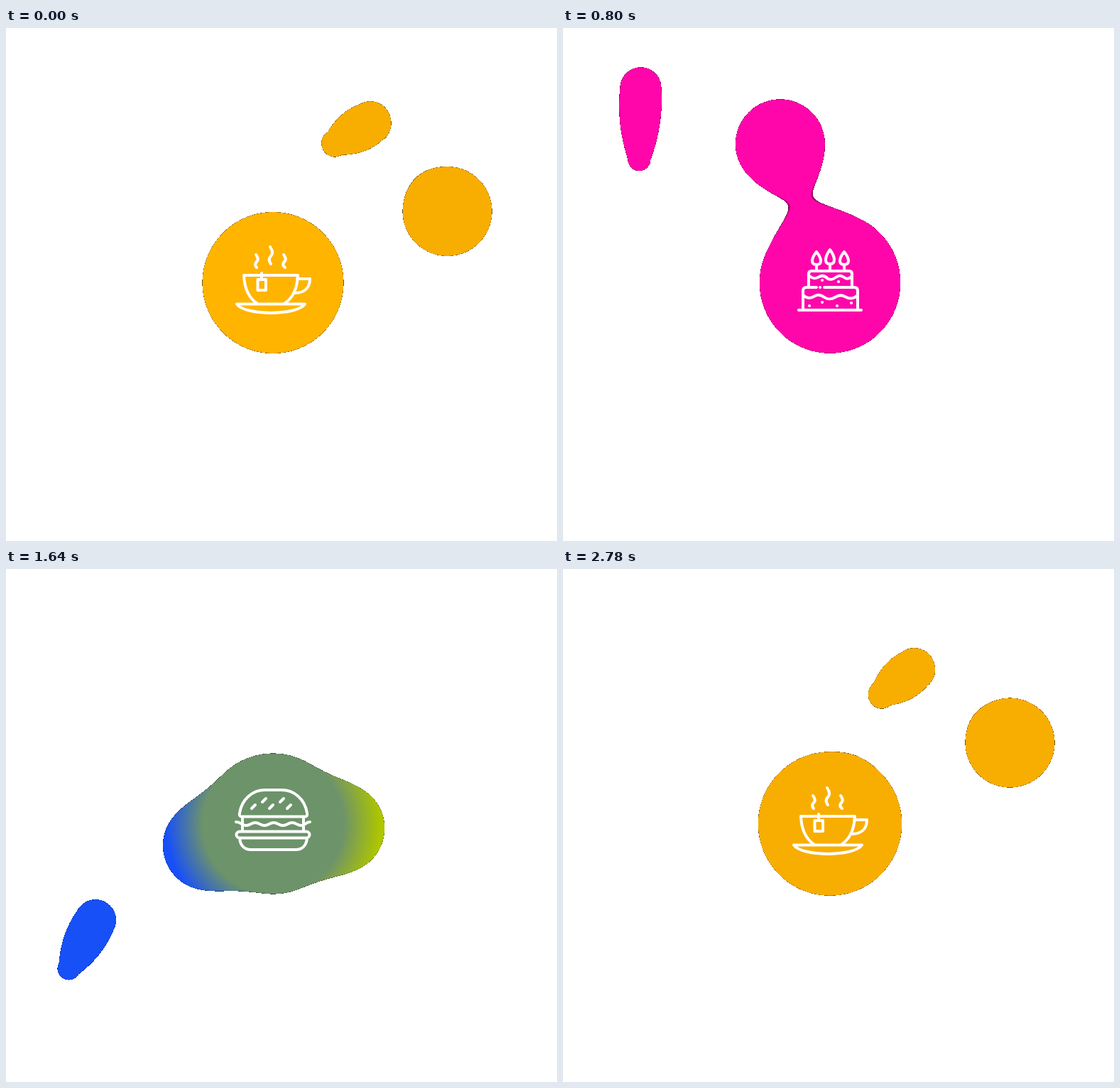
Animation of 776 by 722 pixels, one loop 2800 ms. Source, as an HTML page with a canvas:

```html
<!DOCTYPE html>
<html lang="en">
<head>
<meta charset="utf-8">
<title>Food blobs</title>
<style>
html, body { margin: 0; width: 100%; height: 100%; overflow: hidden; background: #fff; }
canvas { display: block; }
</style>
</head>
<body>
<canvas id="stage" width="776" height="722"></canvas>
<script>
const W = 776, H = 722, CX = 376, CY = 358.5;
const LOOP = 2800, PHASE = 700, BLEND = 97, LAG = 75;
const ctx = document.getElementById('stage').getContext('2d');
const image = ctx.createImageData(W, H);
const pixels = new Uint32Array(image.data.buffer);

// Each item leaves the centre along (fx, fy) and curls clockwise back into it.
const items = [
  { color: [255, 6, 171], fx: -1, fy: 0, su: 1.137, sv: 1.043, dv: 1.05, delay: 0 },
  { color: [24, 80, 248], fx: 0, fy: 1, su: 1.29, sv: 1.03, dv: 1.12, delay: 0 },
  { color: [174, 198, 0], fx: 1, fy: 0, su: 1.2, sv: 1.008, dv: 0.97, delay: 20 },
  { color: [248, 174, 0], fx: 0, fy: -1, su: 1, sv: 1, dv: 1, delay: 0 }
];
const firstColor = [255, 180, 0];

// [time, forward, sideways]
const circlePath = [
  [80, 0, 0], [220, 78, 6], [380, 175, 64], [440, 208, 108], [500, 234, 170],
  [600, 193, 251], [700, 101, 246], [940, 24, 90], [1060, 0, 0]
];
const dropPath = [
  [400, 0, 0], [460, 60, 15], [530, 140, 45], [606, 183, 73], [623, 195, 85], [680, 218, 118],
  [700, 226, 136], [760, 245, 205], [810, 228, 268], [865, 159, 257], [940, 106, 224],
  [985, 60, 166], [1025, 38, 148], [1065, 29, 140], [1160, 0, 0]
];
// [time, radius]
const pulse = [
  [0, 99.5], [240, 99], [340, 99.5], [380, 104], [400, 115],
  [450, 116], [540, 114], [640, 105], [700, 99.5]
];

const icons = [
  // cake
  `M332 397H420 M338 396V370q0-5 5-5H357 M362 365h.1 M368 365H410q5 0 5 5V396
   M338 376c7 6 12 4 17 1s9-1 13 2 10 3 15 0 9-4 14-1 12 4 18-2
   M346 364V346q0-4 4-4H403q4 0 4 4V364 M347 349c6 5 10 3 14 1s8-1 11 2 8 2 12-1 8-3 12 0 7 2 10-1
   M357 333V341 M376 332V341 M396 333V341
   M357 315c8 10 8 18 0 18s-8-8 0-18z M376 312c8 11 8 20 0 20s-8-9 0-20z M396 315c8 10 8 18 0 18s-8-8 0-18z
   M365 355h.1 M388 357h.1 M347 391h.1 M365 386h.1 M386 391h.1 M406 387h.1`,
  // burger
  `M332 348.5H421q4 0 3-5C421 324 406 311 388 311H365C347 311 332 324 329 343.5q-1 5 3 5z
   M346 337l5-5 M361 328l5-5 M371 337l5-5 M386 328l5-5 M396 337l5-5
   M333 349V369 M419 349V369
   M324 356c7 0 8 5 14 5s7-4 13-4 7 4 13 4 7-4 13-4 7 4 13 4 7-4 13-4 7 4 13 4 6-5 12-5
   M329 369.5H423a4.5 4.5 0 0 1 0 9H329a4.5 4.5 0 0 1 0-9z
   M329 379c1 10 7 16 16 16H408c9 0 15-6 16-16`,
  // bottles
  `M341 310H350V335C359 339 360 341 360 347V399.5H332V347C332 341 333 339 341 335z
   M341 317H350 M332 358H360 M332 382H360
   M371 310H381V333C383 342 389 345 389 356V399.5H363V356C363 345 369 342 371 333z
   M371 317H381 M370 370a6 6 0 0 0 12 0a6 6 0 0 0-12 0
   M402 310H411V323C419 328 421 333 421 341V399.5H392V341C392 333 394 328 402 323z
   M402 317H411 M398.5 350h16v40h-16z`,
  // tea cup
  `M352 319c4 5 3 8 1 10s-3 5 0 8 M372 308c4 6 4 10 1 13s-3 7 0 11 M391 319c4 5 3 8 1 10s-3 5 1 8
   M354 388C345 382 336 372 335 348H411C410 372 401 382 392 388
   M410 353H428C428 366 420 373 406 373
   M325 388.5H421C410 405 336 405 325 388.5z
   M360 345V354 M354.5 354h11.5v15h-11.5z`
].map(d => new Path2D(d));

const clamp = (x, lo = 0, hi = 1) => Math.min(hi, Math.max(lo, x));
const mix = (a, b, k) => a.map((v, i) => v + (b[i] - v) * k);

// Smooth curve through timed keys; returns the values at time p.
function track(keys, p) {
  const last = keys.length - 1;
  if (p <= keys[0][0]) return keys[0].slice(1);
  if (p >= keys[last][0]) return keys[last].slice(1);
  let i = 0;
  while (p >= keys[i + 1][0]) i++;
  const a = keys[i], b = keys[i + 1];
  const before = keys[Math.max(0, i - 1)], after = keys[Math.min(last, i + 2)];
  const h = b[0] - a[0], s = (p - a[0]) / h, r = 1 - s;
  return a.slice(1).map((v, j) => {
    const n = j + 1;
    const m0 = (b[n] - before[n]) / (b[0] - before[0]) * h;
    const m1 = (after[n] - a[n]) / (after[0] - a[0]) * h;
    return r * r * (1 + 2 * s) * v + s * r * r * m0 + s * s * (3 - 2 * s) * b[n] - s * s * r * m1;
  });
}

function place(item, [u, v], sv) {
  u *= item.su;
  v *= sv;
  return [CX + item.fx * u - item.fy * v, CY + item.fy * u + item.fx * v];
}

// A blob is a rounded capsule from (x, y) to (x + dx, y + dy) with a swollen waist.
function blob(color, [x, y], r, [ex, ey], er) {
  const dx = ex - x, dy = ey - y;
  const reach = Math.max(Math.hypot(x - CX, y - CY), Math.hypot(ex - CX, ey - CY));
  return { color, x, y, r, dx, dy, taper: er - r, len: dx * dx + dy * dy || 1,
           k: BLEND * clamp((reach - 30) / 150) };
}

// The tail gets thinner the further it is stretched.
function drop(color, head, tail) {
  const stretch = Math.hypot(tail[0] - head[0], tail[1] - head[1]);
  return blob(color, head, 29, tail, clamp(42 - stretch * 0.4, 16, 29));
}

function blobsAt(t) {
  const list = [];
  items.forEach((item, i) => {
    const p = (t - PHASE * i - item.delay + LOOP) % LOOP;
    if (p > 80 && p < 1060) {
      const c = place(item, track(circlePath, p), item.sv);
      list.push(blob(item.color, c, 63, c, 63));
    }
    if (p > 400 && p < 1160 + LAG) {
      const [head, tail] = [p, p - LAG].map(s => place(item, track(dropPath, s), item.dv));
      list.push(drop(item.color, head, tail));
    }
  });
  return list.filter(b => b.k > 0);
}

function paint(blobs, radius, main) {
  pixels.fill(0xffffffff);
  for (let y = 0, at = 0; y < H; y++) {
    for (let x = 0; x < W; x++, at++) {
      const mx = x + 0.5 - CX, my = y + 0.5 - CY;
      const core = Math.sqrt(mx * mx + my * my) - radius;
      let d = core, near = 1e9, color = main;
      for (const b of blobs) {
        const px = x + 0.5 - b.x, py = y + 0.5 - b.y;
        let h = (px * b.dx + py * b.dy) / b.len;
        h = h < 0 ? 0 : h > 1 ? 1 : h;
        const qx = px - b.dx * h, qy = py - b.dy * h;
        const e = Math.sqrt(qx * qx + qy * qy) - b.r - b.taper * h - 22 * h * (1 - h);
        if (e < near) { near = e; color = b.color; }
        const gap = b.k - Math.abs(d - e);
        if (e < d) d = e;
        if (gap > 0) d -= gap * gap / (4 * b.k);
      }
      if (d > 0.1) continue;
      // Rim pixels fade to black, giving the thin dark edge.
      const rim = d < -0.5 ? 1 : 0.5 - d;
      const k = clamp(core / 52);
      const r = (main[0] + (color[0] - main[0]) * k) * rim;
      const g = (main[1] + (color[1] - main[1]) * k) * rim;
      const b = (main[2] + (color[2] - main[2]) * k) * rim;
      pixels[at] = 0xff000000 | b << 16 | g << 8 | r;
    }
  }
  ctx.putImageData(image, 0, 0);
}

function drawIcon(n, alpha) {
  ctx.globalAlpha = alpha;
  if (alpha > 0) ctx.stroke(icons[n]);
}

function frame() {
  const t = performance.now() % LOOP;
  const step = Math.floor(t / PHASE), q = t % PHASE, prev = (step + 3) % 4;
  const from = step ? items[prev].color : firstColor;
  const main = mix(from, items[step].color, clamp((q - 130) / 195));
  paint(blobsAt(t), track(pulse, q)[0], main);

  ctx.strokeStyle = '#fff';
  ctx.lineWidth = 4;
  ctx.lineCap = ctx.lineJoin = 'round';
  const swap = clamp((q - 280) / 60);
  drawIcon(prev, 1 - swap);
  drawIcon(step, swap);
  requestAnimationFrame(frame);
}
frame();
</script>
</body>
</html>
```
